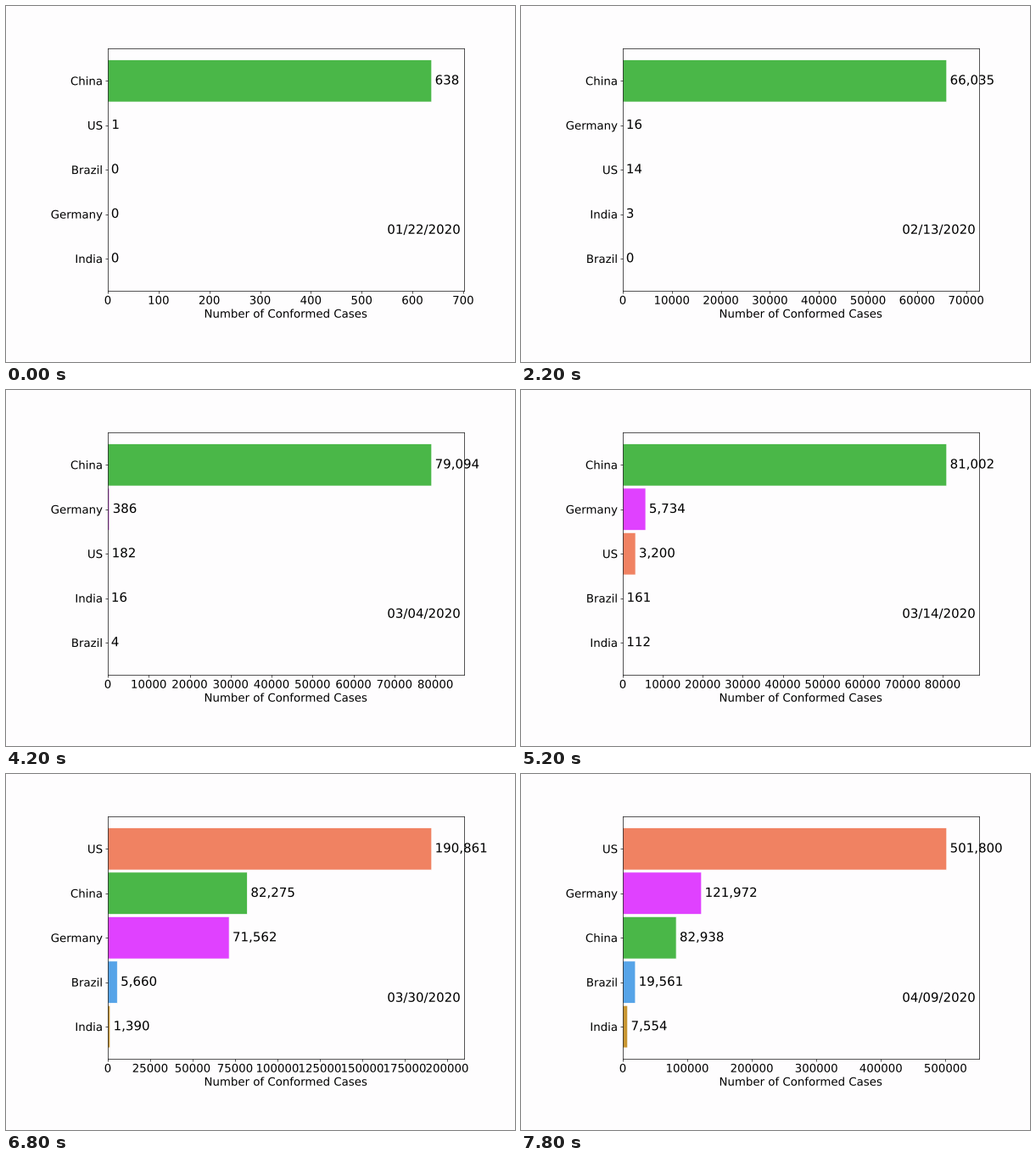
A matplotlib script that plays this animation: 600 px wide and 420 px high, repeating every 8000 ms.

```python
import numpy as np
import matplotlib.pyplot as plt
from matplotlib import patheffects
from matplotlib.animation import FuncAnimation

FRAMES = 40
STEP_DAYS = 2
BG = "#fefdfe"
plt.rcParams["font.family"] = "DejaVu Sans"
plt.rcParams["text.hinting"] = "none"
# Outlined glyphs keep sub-pixel text positions
plt.rcParams["path.effects"] = [patheffects.Normal()]

# Colour and (step, cases) turning points; growth is exponential in between.
# Alphabetical order settles ties.
COUNTRIES = {
    "Brazil": ("#56a4e8", [(16, 0), (21, 4), (24, 38), (25, 146), (26, 161),
                           (31, 2539), (34, 5660), (39, 19561)]),
    "China": ("#4ab748", [(0, 638), (3, 6058), (6, 23507), (10, 44740),
                          (11, 66035), (16, 77230), (26, 81002), (31, 81658),
                          (34, 82275), (39, 82938)]),
    "Germany": ("#e041ff", [(1, 0), (3, 4), (5, 10), (10, 16), (16, 16),
                            (19, 127), (23, 1169), (26, 5734), (28, 15170),
                            (31, 37106), (34, 71562), (36, 95845),
                            (39, 121972)]),
    "India": ("#c89632", [(3, 0), (6, 3), (19, 3), (22, 34), (26, 112),
                          (31, 651), (34, 1390), (39, 7554)]),
    "US": ("#f08262", [(0, 1), (4, 8), (11, 14), (16, 16), (18, 17),
                       (22, 395), (26, 3200), (29, 25725), (31, 68169),
                       (34, 190861), (39, 501800)]),
}


def cases(name, i):
    steps, counts = zip(*COUNTRIES[name][1])
    return round(float(np.expm1(np.interp(i, steps, np.log1p(counts)))))


def date_text(i):
    day = np.datetime64("2020-01-22") + STEP_DAYS * i
    y, m, d = str(day).split("-")
    return f"{m}/{d}/{y}"


fig, ax = plt.subplots(figsize=(10, 7), dpi=60, facecolor=BG)
fig.subplots_adjust(left=0.2, right=0.9, bottom=0.2, top=0.88)


def draw(i):
    ax.clear()
    ax.set_facecolor(BG)
    totals = {name: cases(name, i) for name in COUNTRIES}
    names = sorted(totals, key=lambda n: -totals[n])
    values = [totals[n] for n in names]
    colors = [COUNTRIES[n][0] for n in names]
    rows = list(range(len(names)))[::-1]
    top = values[0]

    ax.barh(rows, values, height=0.95, color=colors,
            edgecolor=BG, linewidth=1, snap=False)
    for row, value in zip(rows, values):
        ax.text(value + top / 100, row, f"{value:,}", size=18, va="center")
    ax.text(0.99, 0.25, date_text(i), size=18, ha="right", va="center",
            transform=ax.transAxes)

    ax.set_xlim(0, top * 1.1)
    ax.set_yticks(rows, names)
    ax.tick_params(labelsize=16)
    ax.set_xlabel("Number of Conformed Cases", size=16)


anim = FuncAnimation(fig, draw, frames=FRAMES, interval=200,
                     init_func=lambda: None, repeat=True, repeat_delay=0)
plt.show()
```
